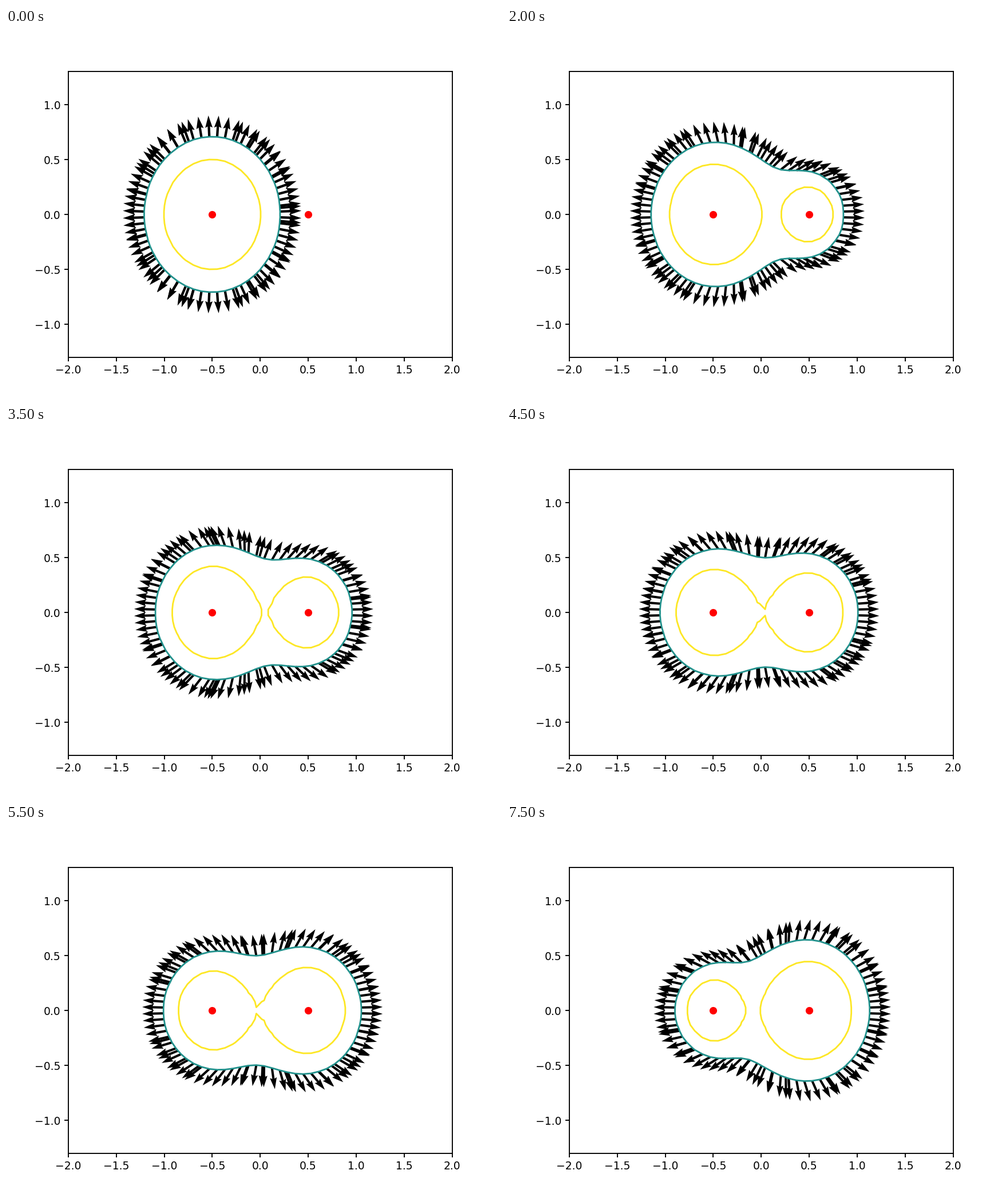
These frames come from a looping animation (865x647 px, 8 s). A matplotlib script:

```python
import numpy as np
import matplotlib.pyplot as plt
from matplotlib.animation import FuncAnimation

W, H, DPI = 865, 647, 135
FRAMES, INTERVAL = 16, 500
LEFT, RIGHT = -0.5, 0.5
XLIM, YLIM = (-2, 2), (-1.3, 1.3)

plt.rcParams.update({"axes.linewidth": 1, "xtick.major.width": 1,
                     "ytick.major.width": 1})

X, Y = np.meshgrid(np.linspace(*XLIM, 50), np.linspace(*YLIM, 50))

# The tiny surplus keeps the canvas from being truncated by a pixel.
fig = plt.figure(figsize=((W + 1e-6) / DPI, (H + 1e-6) / DPI), dpi=DPI)
ax = fig.add_axes([108.9 / W, 71.4 / H, 670.65 / W, 499.2 / H])


def potential(t):
    """Two inverse-square sources; the strength moves from left to right."""
    near = (1 - t) / ((X - LEFT) ** 2 + Y ** 2)
    far = t / ((X - RIGHT) ** 2 + Y ** 2)
    return near + far


def update(i):
    t = i / 20
    ax.cla()
    rings = ax.contour(X, Y, potential(t), levels=[2, 4],
                       cmap="viridis", vmin=0, vmax=4)

    # Unit arrows on the outer contour, pointing away from the weighted centre.
    base = np.concatenate(rings.allsegs[0])
    out = base - [(1 - t) * LEFT + t * RIGHT, 0]
    out /= np.hypot(out[:, 0], out[:, 1])[:, None]
    ax.quiver(*base.T, *out.T)

    ax.plot([LEFT, RIGHT], [0, 0], "ro")
    ax.set(xlim=XLIM, ylim=YLIM)
    return []


anim = FuncAnimation(fig, update, frames=FRAMES, init_func=lambda: update(0),
                     interval=INTERVAL, repeat=True, repeat_delay=0, blit=False)
plt.show()
```
